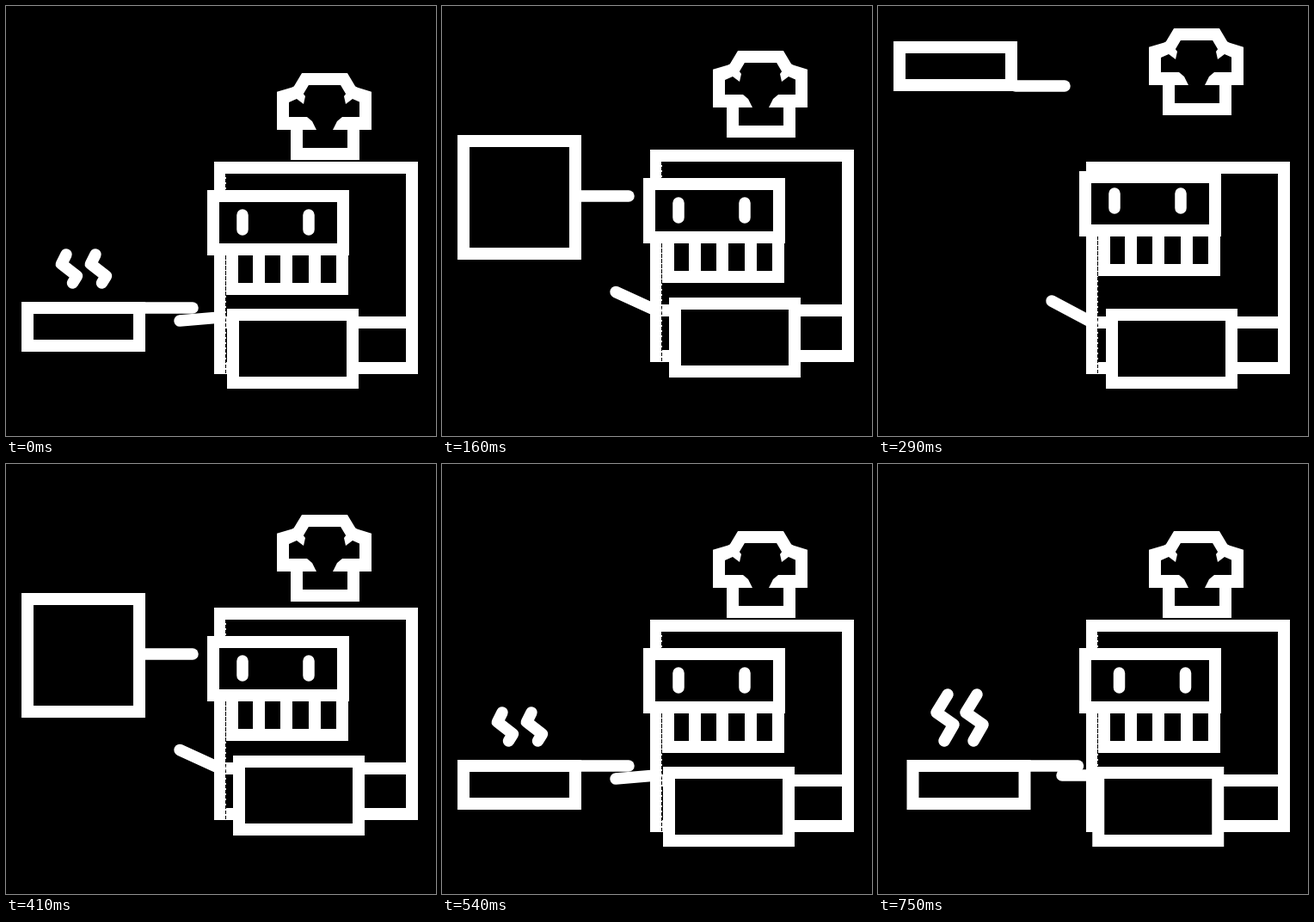
An HTML page for the animation above (0.83 s loop, 500 by 500 pixels).

```html
<!DOCTYPE html>
<html lang="en">
<head>
<meta charset="utf-8">
<title>Robot chef</title>
<style>
  html, body { margin: 0; width: 100%; height: 100%; overflow: hidden; background: #000; }
  svg { display: block; width: 100vw; height: 100vh; }
  .ink { fill: #000; stroke: #fff; stroke-width: 14; }
  .line { fill: none; stroke-width: 13.5; stroke-linecap: round; stroke-linejoin: round; }
  .solid { fill: #fff; }
  .seam { stroke: #000; stroke-dasharray: 4 2; }
</style>
</head>
<body>
<svg viewBox="0 0 500 500">
  <g id="body">
    <path class="ink" d="M249 188H472V421H249ZM249 368H472"/>
    <path class="seam" d="M255.5 195V428"/>
  </g>
  <path id="arm" class="ink line"/>
  <rect id="panel" class="ink" width="139" height="79"/>
  <g id="face">
    <path class="solid" d="M256 283H398V336H256Z"/>
    <path d="M270 290h17v32h-17ZM301 290h18v32h-18ZM333 290h19v32h-19ZM366 290h18v32h-18Z"/>
    <path class="seam" d="M255.5 290V336"/>
    <rect class="ink" x="241" y="221" width="151" height="62"/>
    <path id="eyes" class="ink line" d="M275 243V260M352 243V260"/>
  </g>
  <g id="hat">
    <path class="ink" d="M348 85H393L402 100L418 105V137H404V172H338V137H322V105L339 100Z"/>
    <path id="puff" class="solid" d="M337 92H350L345 101L348 105L346 114L338 108L329 112L325 100ZM329 129H350L356 134L361 144H331Z"/>
    <use href="#puff" transform="translate(741) scale(-1 1)"/>
  </g>
  <rect id="pan" class="ink" width="130"/>
  <path id="handle" class="ink line"/>
  <path id="steam" class="ink line"/>
</svg>
<script>
const LOOP = 830;
const STARTS = [0, 80, 160, 200, 290, 330, 410, 500, 540, 620, 660, 750];
const TOP_STEP = 4;    // pan highest, upside down
const SHAKE_STEP = 10; // middle of the sideways shake
const REST = "M70 289L64.500 300L82.500 314L77.500 322";
const RISE = "M81 268L68 289L88 303L77 322";

const el = id => document.getElementById(id);
const set = (id, attrs) => {
  for (const name in attrs) el(id).setAttribute(name, attrs[name]);
};
const move = (id, x, y) => set(id, { transform: `translate(${x} ${y})` });
const twin = d => d + d.replace(/([ML])([\d.]+)/g, (_, cmd, x) => cmd + (+x + 34));

function draw(step) {
  // flip: 0 at rest, 1 at the top; turn: 1 when the pan is seen flat on
  const flip = Math.max(0, 1 - Math.abs(step - TOP_STEP) / TOP_STEP);
  const turn = 1 - Math.abs(2 * flip - 1);
  const shaking = step > 2 * TOP_STEP;
  const shake = shaking ? step - SHAKE_STEP : 0;

  const panX = 15.5 * shake;
  const height = 58 + 87 * turn;
  const top = 373 - 303 * flip + turn - height / 2;
  const grip = 351 - 258 * flip - turn;
  const handX = shaking ? 205 + 9 * shake : 202;
  const handY = shaking ? 362 : 366 - 23 * flip - 22 * turn;

  move("body", 0, -14 * turn);
  move("face", 0, -22 * flip - 3 * turn);
  move("eyes", shaking ? 11 - 5.5 * Math.abs(shake) : 0, -3 * Math.max(0, 2 * flip - 1));
  move("hat", 0, -52 * flip ** (step > TOP_STEP ? 1.45 : 1));
  set("arm", { d: `M${handX} ${handY}L249 ${362 + 6 * flip - 11 * turn}` });
  set("panel", { x: 264 + 8 * flip + 3 * turn - panX / 2, y: 359 - 13 * turn });
  set("pan", { x: 25 + panX, y: top + 7, height: height - 14 });
  set("handle", { d: `M${160 + panX} ${grip}H${217 + panX}` });
  set("steam", {
    d: twin(shake > 0 ? RISE : REST),
    visibility: flip ? "hidden" : "visible"
  });
}

let shown;
function tick(now) {
  const step = STARTS.findLastIndex(start => start <= now % LOOP);
  if (step !== shown) draw(shown = step);
  requestAnimationFrame(tick);
}
tick(performance.now());
</script>
</body>
</html>
```
